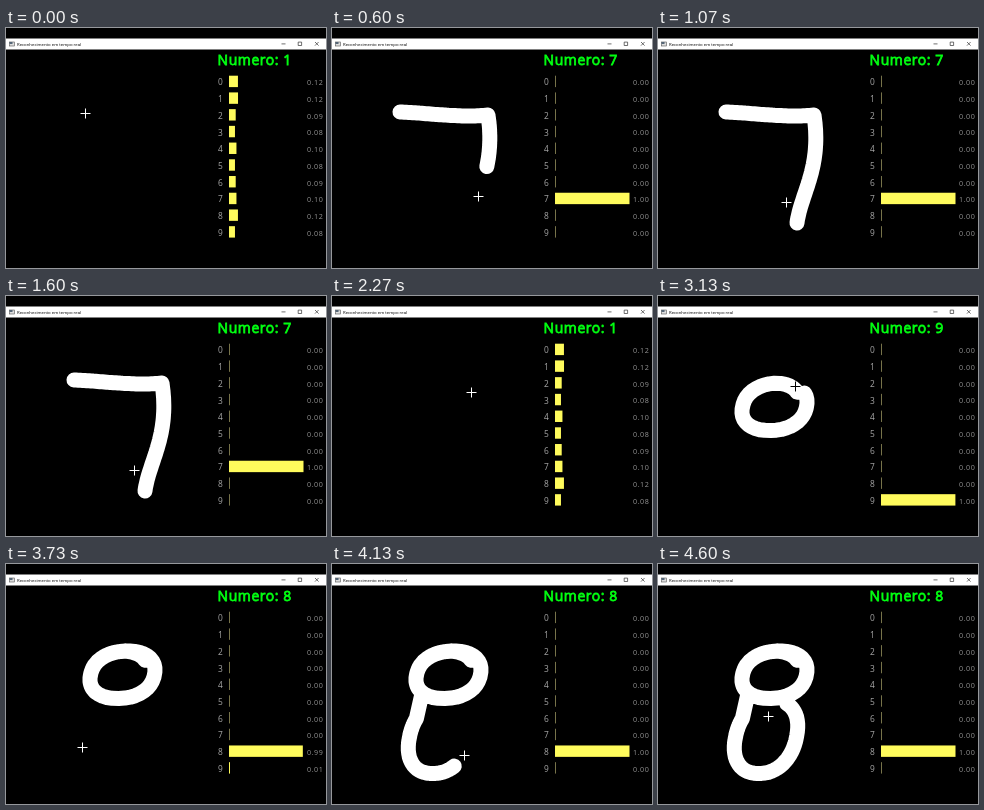
These frames come from a looping animation (320 px wide and 240 px high, 4670 ms). An HTML page:

```html
<!DOCTYPE html>
<html lang="pt">
<head>
<meta charset="utf-8">
<title>Reconhecimento em tempo real</title>
<style>
  html, body { margin: 0; width: 100%; height: 100%; overflow: hidden; background: #000; }
  svg { display: block; width: 320px; height: 240px; isolation: isolate; }
  text { font-family: "Open Sans", "Noto Sans", sans-serif; white-space: pre; }
  .title { font-size: 4.3px; fill: #000; }
  .result { font-size: 14px; letter-spacing: .55px; fill: #0f1; stroke: #0f1; stroke-width: .8; }
  .label { font-size: 8.4px; fill: #a8a8a8; }
  .prob { font-size: 7.2px; letter-spacing: .55px; fill: #949494; }
  .ink { fill: none; stroke: #fff; stroke-width: 15; stroke-linecap: round; stroke-linejoin: round; }
  .cursor { fill: none; stroke: #fff; stroke-width: 1; mix-blend-mode: difference; }
</style>
</head>
<body>
<svg viewBox="0 0 320 240">
  <rect width="320" height="240" fill="#000"/>
  <rect y="10.5" width="320" height="11" fill="#fff"/>
  <rect x="3.5" y="14" width="5" height="4" fill="#ddd" stroke="#555" stroke-width=".6"/>
  <rect x="3.5" y="14" width="3" height="2" fill="#567"/>
  <text class="title" x="11" y="17.6">Reconhecimento em tempo real</text>
  <path d="M275.5 15.9h4M292.2 14.1h3.4v3.4h-3.4zM309 14l3.6 3.6M312.6 14l-3.6 3.6"
        fill="none" stroke="#333" stroke-width=".7"/>
  <text class="result" x="211.6" y="37.3"></text>
  <g id="rows"></g>
  <path class="ink"/>
  <path class="cursor" d="M-4.5 .5h10M.5 -4.5v10"/>
</svg>
<script>
const LOOP = 4670, STEP = 200 / 3, LAST = 69;
const BAR_X = 223, BAR_W = 74.5, ROW_H = 16.72;
const CLEAR = 29;

const lerp = (a, b, u) => a + (b - a) * u;

// Bezier curve of any degree.
const bezier = (...pts) => u => {
  let p = pts;
  while (p.length > 1) {
    p = p.slice(1).map((q, i) => [lerp(p[i][0], q[0], u), lerp(p[i][1], q[1], u)]);
  }
  return p[0];
};

// Slanted, slightly squared oval, run from angle a to b in degrees.
const oval = (cx, cy, rx, ry) => (a, b, inset = 0) => u => {
  const t = lerp(a, b, u) * Math.PI / 180;
  const bulge = v => Math.sign(v) * Math.abs(v) ** .9;
  const r = 1 - inset * Math.max(0, 1 - u * 8);
  const dy = -r * ry * bulge(Math.sin(t));
  return [cx + r * rx * bulge(Math.cos(t)) - .2 * dy, cy + dy];
};
const upper = oval(116.5, 110.8, 32, 23.7);
const lower = oval(108, 173, 30.5, 36.5);

// Pen moves: first step, last step, path, pen down.
const moves = [
  [-1, 6.7, bezier([68, 84], [96, 85], [128, 90], [156, 87]), true],
  [6.7, 10, bezier([156, 87], [164, 140], [143, 165], [139, 195]), true],
  [10, 15, bezier([139, 195], [128, 174])],
  [27, 34, bezier([128, 174], [139, 95])],
  [34, 47, upper(45, 422, .16), true],
  [47, 54, upper(422, 587), true],
  [55, 56, lower(152, 193), true],
  [56, 66, lower(193, 425), true],
  [66, LAST, bezier([126, 140], [110, 152])]
];
const progress = ([from, to], k) => Math.min(1, (k - from) / (to - from));

// First step, digit, runner-up; no digit means an empty board.
const guesses = [[0], [2, 7, 5], [CLEAR], [36, 7, 5], [39, 0, 6], [44, 9, 0], [54, 8, 9]];
const idle = [.12, .121, .09, .08, .1, .08, .09, .1, .12, .08];

const $ = sel => document.querySelector(sel);
const result = $('.result'), ink = $('.ink'), cursor = $('.cursor');

function add(tag, attrs, text = '') {
  const el = document.createElementNS('http://www.w3.org/2000/svg', tag);
  for (const key in attrs) el.setAttribute(key, attrs[key]);
  el.textContent = text;
  return $('#rows').appendChild(el);
}

const rows = idle.map((_, i) => {
  const y = i * ROW_H;
  add('text', { class: 'label', x: 212, y: y + 57.4 }, i);
  return {
    bar: add('rect', { x: BAR_X, y: y + 47.7, height: 11.4 }),
    prob: add('text', { class: 'prob', x: 301, y: y + 57.2 })
  };
});

function penAt(k) {
  const move = moves.filter(m => m[0] <= k).pop();
  return move[2](progress(move, k));
}

// Ink since the last wipe, one step behind the pen.
function inkAt(k) {
  const pts = [], n = 40;
  for (const move of moves) {
    const [from, , path, down] = move;
    if (!down || from >= k - 1 || (k >= CLEAR && from < CLEAR)) continue;
    const end = progress(move, k - 1);
    for (let i = 0; i <= n; i++) pts.push(path(end * i / n).map(v => v.toFixed(1)));
  }
  return pts.length ? 'M' + pts.join('L') : '';
}

function valuesAt(k) {
  const [from, digit, second] = guesses.filter(g => g[0] <= k).pop();
  if (digit === undefined) return idle;
  const doubt = .4 * .15 ** (k - from);
  return idle.map((_, i) => i === digit ? 1 - doubt : i === second ? doubt : 0);
}

function showGuess(vals) {
  result.textContent = 'Numero: ' + vals.indexOf(Math.max(...vals));
  rows.forEach(({ bar, prob }, i) => {
    bar.setAttribute('width', Math.max(1, vals[i] * BAR_W));
    bar.setAttribute('fill', vals[i] > .005 ? '#fffb5c' : '#77734a');
    prob.textContent = vals[i].toFixed(2);
  });
}

let shown = -1;
function draw(now) {
  const k = Math.min(LAST, Math.floor((now % LOOP + 3.4) / STEP));
  if (k === shown) return;
  shown = k;
  const [x, y] = penAt(k).map(Math.round);
  cursor.setAttribute('transform', `translate(${x} ${y})`);
  ink.setAttribute('d', inkAt(k));
  showGuess(valuesAt(k));
}

const begin = performance.now();
function tick() {
  draw(performance.now() - begin);
  requestAnimationFrame(tick);
}
tick();
</script>
</body>
</html>
```
